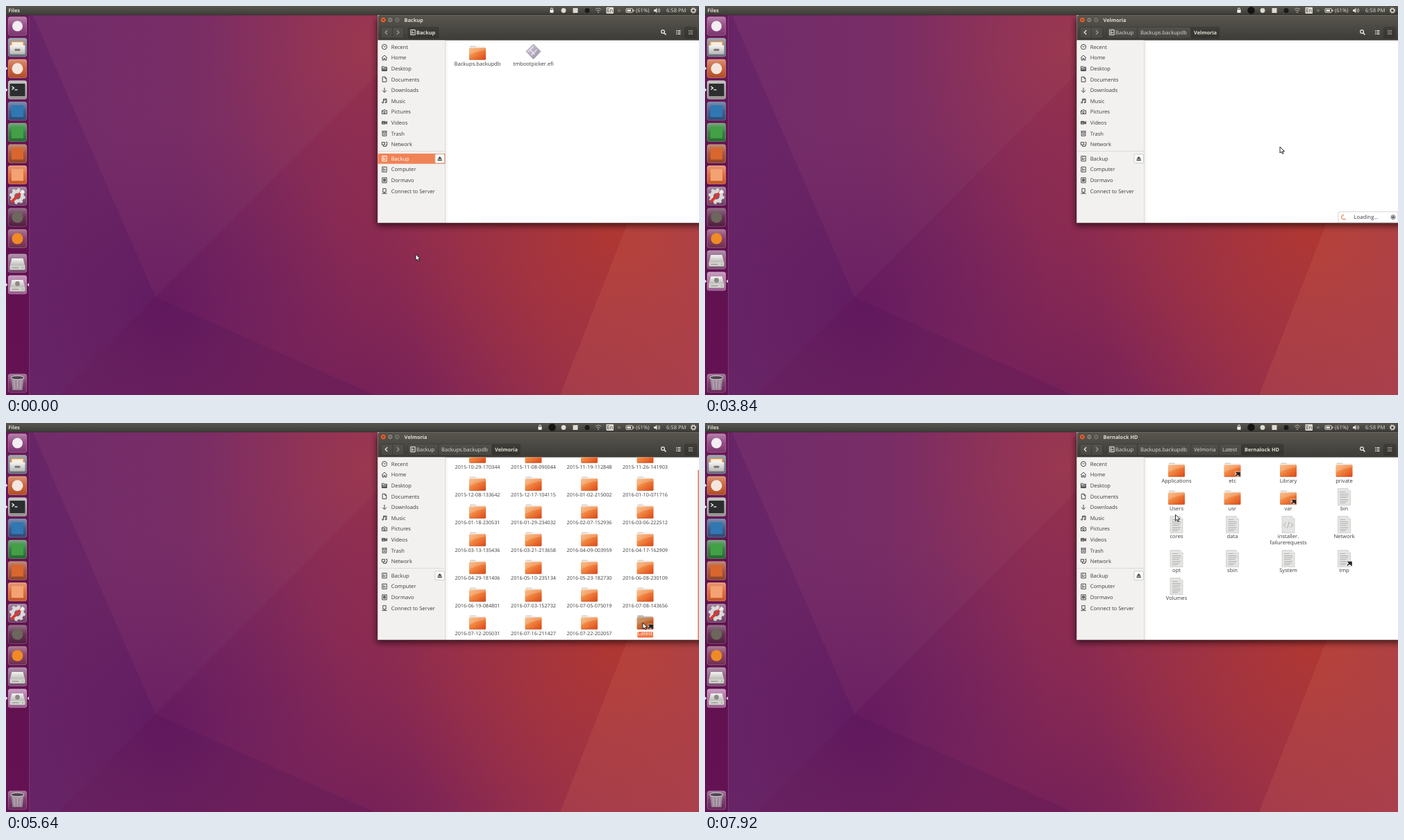
An HTML page that plays this animation: 998 px wide and 561 px high, repeating every 8 s.

```html
<!DOCTYPE html>
<html lang="en">
<head>
<meta charset="utf-8">
<title>File browser</title>
<style>
  html, body { margin: 0; width: 100%; height: 100%; overflow: hidden; background: #6c2566; }
  svg { display: block; width: 100%; height: 100%; }
  text { font: 7.6px "Open Sans", "Noto Sans", sans-serif; fill: #3c3c3c; text-rendering: geometricPrecision; }
  .bold { font-weight: 700; font-size: 7.35px; }
  .light { fill: #dfdbd2; }
  .label { text-anchor: middle; }
  .date { font-size: 7.25px; }
  .line { fill: none; stroke: #4a4a4a; stroke-width: 1; }
  .picked text, .picked .line { fill: #fff; }
  .picked .line { fill: none; stroke: #fff; }
  .hover { filter: brightness(1.08); }
  .chosen { filter: brightness(.82); }
  .chip { fill: #f07746; }
</style>
</head>
<body>
<svg viewBox="0 0 998 561">
  <defs>
    <linearGradient id="wall">
      <stop offset="0" stop-color="#6d2768"/><stop offset=".25" stop-color="#752862"/>
      <stop offset=".5" stop-color="#8b2b52"/><stop offset=".8" stop-color="#98304a"/>
      <stop offset="1" stop-color="#9e354a"/>
    </linearGradient>
    <radialGradient id="red" gradientUnits="userSpaceOnUse" cx="870" cy="325" r="330">
      <stop offset="0" stop-color="#b23830" stop-opacity=".9"/><stop offset="1" stop-color="#a23440" stop-opacity="0"/>
    </radialGradient>
    <radialGradient id="rose" gradientUnits="userSpaceOnUse" cx="520" cy="60" r="230">
      <stop offset="0" stop-color="#9c354a" stop-opacity=".8"/><stop offset="1" stop-color="#8c2f55" stop-opacity="0"/>
    </radialGradient>
    <radialGradient id="plum" gradientUnits="userSpaceOnUse" cx="230" cy="430" r="270">
      <stop offset="0" stop-color="#65195f" stop-opacity=".9"/><stop offset="1" stop-color="#6b1f5e" stop-opacity="0"/>
    </radialGradient>
    <radialGradient id="dusk" gradientUnits="userSpaceOnUse" cx="500" cy="610" r="330">
      <stop offset="0" stop-color="#6a1c5c" stop-opacity=".85"/><stop offset="1" stop-color="#7a2158" stop-opacity="0"/>
    </radialGradient>
    <linearGradient id="bar" x2="0" y2="1">
      <stop offset="0" stop-color="#58564e"/><stop offset="1" stop-color="#3d3c38"/>
    </linearGradient>
    <linearGradient id="dock" x2="0" y2="1">
      <stop offset="0" stop-color="#691a58"/><stop offset=".5" stop-color="#60104f"/><stop offset="1" stop-color="#641253"/>
    </linearGradient>
    <linearGradient id="gloss" x2="0" y2="1">
      <stop offset="0" stop-color="#fff" stop-opacity=".35"/><stop offset=".5" stop-color="#fff" stop-opacity=".08"/>
      <stop offset="1" stop-color="#000" stop-opacity=".12"/>
    </linearGradient>
    <linearGradient id="metal" x2="0" y2="1">
      <stop offset="0" stop-color="#f4f4f2"/><stop offset="1" stop-color="#b9b7b4"/>
    </linearGradient>
    <linearGradient id="orange" x2="1" y2="1">
      <stop offset="0" stop-color="#f7b06f"/><stop offset=".45" stop-color="#f0843f"/><stop offset="1" stop-color="#dc4616"/>
    </linearGradient>
    <linearGradient id="violet" x2="1" y2="1">
      <stop offset="0" stop-color="#d8d2e0"/><stop offset="1" stop-color="#9488a4"/>
    </linearGradient>
    <radialGradient id="glow" cx=".35" cy="1" r=".75" fy="1">
      <stop offset="0" stop-color="#f4f4f4" stop-opacity=".8"/><stop offset=".6" stop-color="#fafafa" stop-opacity=".6"/>
      <stop offset="1" stop-color="#fff" stop-opacity="0"/>
    </radialGradient>
    <linearGradient id="fade" x2="0" y2="1">
      <stop offset="0" stop-opacity="0"/><stop offset="1" stop-opacity=".07"/>
    </linearGradient>
    <filter id="shadow" x="-10%" y="-10%" width="120%" height="120%"><feGaussianBlur stdDeviation="5"/></filter>
    <clipPath id="pane"><path d="M633 49.5H998V312.5H633Z"/></clipPath>

    <g id="folder">
      <path d="M-11-9.5H-3L-2-8.3H11V-3H-11Z" fill="#d9cfc6"/>
      <path d="M-10.5-8H10.5V0H-10.5Z" fill="#f4f0ec"/>
      <rect x="-12" y="-6.5" width="24" height="17" rx="1" fill="url(#orange)"/>
      <path d="M-11.5-6H11.5V-3Q-1-2-11.5 4Z" fill="#fff" opacity=".2"/>
      <path d="M-11.5 10.2H11.5" stroke="#b8451c" stroke-width=".6"/>
    </g>
    <g id="file">
      <path d="M-9-12.5H5L9-8.5V11.5H-9Z" fill="#e4e4e2" stroke="#c2c2c0" stroke-width=".6"/>
      <path d="M5-12.5V-8.5H9Z" fill="#fafafa" stroke="#c2c2c0" stroke-width=".5"/>
    </g>
    <g id="doc"><use href="#file"/><path d="M-6-7.5H2M-6-4.5H6M-6-2H6M-6 .5H4M-6 3.5H6M-6 6H5M-6 8.3H2" stroke="#b2b2b0" stroke-width="1"/></g>
    <g id="code"><use href="#file"/><path d="M-3.5-3.5L-6.5 0L-3.5 3.5M3.5-3.5L6.5 0L3.5 3.5M1.2-4.5L-1.2 4.5" fill="none" stroke="#aaa"/></g>
    <g id="efi">
      <path d="M0-12L10.5-1.5L0 9.5L-10.5-1.5Z" fill="url(#violet)" stroke="#8d839b" stroke-width=".6"/>
      <path d="M-7-1.5L0-8.5M-3 4L5-4M-4-3L2 3" stroke="#eee9f3" stroke-width="1.3"/>
    </g>
    <g id="link"><rect x="3.5" y="2.5" width="8" height="8" fill="#eee" opacity=".55"/><path d="M4.5 9.5L8.5 5.5M6 4.5H10.5V9Z" fill="#222" stroke="#222" stroke-width="1.5"/></g>
    <g id="drive">
      <path d="M-8-7H8L11 4H-11Z" fill="url(#metal)"/><rect x="-11" y="3.5" width="22" height="6" rx="1" fill="#d4d2cf"/>
      <path d="M-8 6.5H2" stroke="#8c8a88"/><circle cx="7.5" cy="6.5" r="1" fill="#6c6"/>
    </g>
  </defs>

  <rect width="998" height="561" fill="url(#wall)"/>
  <rect width="998" height="561" fill="url(#rose)"/>
  <rect width="998" height="561" fill="url(#dusk)"/>
  <rect width="998" height="561" fill="url(#plum)"/>
  <rect width="998" height="561" fill="url(#red)"/>
  <path d="M33 0L215 420L75 561H33Z" fill="#4d2068" opacity=".2"/>
  <path d="M33 0H632L215 420Z" fill="#fff" opacity=".025"/>
  <path d="M215 420L530 561H75Z" fill="#3c0c4c" opacity=".13"/>
  <path d="M895 313L798 561H998V313Z" fill="#ff9a70" opacity=".1"/>

  <rect y="13" width="33" height="548" fill="url(#dock)"/>
  <path d="M33.5 13V561" stroke="#8d4878" stroke-width=".7" opacity=".7"/>
  <g id="launcher"></g>
  <g id="drives"></g>

  <rect width="998" height="13" fill="url(#bar)"/>
  <path d="M0 13H998" stroke="#2c2a28" stroke-width=".6"/>
  <text class="bold light" x="3.5" y="8.8">Files</text>
  <g id="tray">
    <g id="lock"><rect x="-2.5" y="-.8" width="5" height="4" fill="#fff"/><path d="M-1.5-.5V-2A1.5 1.5 0 0 1 1.5-2V-.5" fill="none" stroke="#fff"/></g>
    <circle id="badge" cx="786.5" cy="6.3" r="5.2" fill="#161412"/>
    <circle cx="803" cy="6.5" r="3.4" fill="#dfdbd2"/>
    <rect x="816.5" y="3" width="7" height="7" fill="#dfdbd2"/>
    <circle cx="837" cy="6.5" r="3.5" fill="#1c1b19"/>
    <g fill="none" stroke="#aaa69d"><path d="M848.8 5Q853 1.3 857.2 5M850.3 7Q853 4.6 855.7 7"/><circle cx="853" cy="9" r=".7"/></g>
    <rect x="864.5" y="1.7" width="10.5" height="9.3" rx="1" fill="#dfdbd2"/>
    <text x="869.8" y="9" class="label">En</text>
    <circle cx="883" cy="6.5" r="2.3" fill="#6b6860"/>
    <rect x="893" y="3.7" width="9.6" height="5.6" rx="1" fill="none" stroke="#dfdbd2"/>
    <path d="M894.5 5H900V8H894.5ZM903.3 5.3H904.5V7.7H903.3Z" fill="#dfdbd2"/>
    <text class="light" x="907" y="9">(61%)</text>
    <path d="M933 5H935L937.5 2.7V10.3L935 8H933Z" fill="#dfdbd2"/>
    <path d="M939 4.5Q940.5 6.5 939 8.5M940.5 3.3Q943 6.5 940.5 9.7" fill="none" stroke="#dfdbd2" stroke-width=".9"/>
    <text class="light" x="951" y="9">6:58 PM</text>
    <circle cx="990" cy="6.5" r="2.5" fill="none" stroke="#dfdbd2" stroke-width="1.3"/>
    <circle cx="990" cy="6.5" r="3.7" fill="none" stroke="#dfdbd2" stroke-width="1.2" stroke-dasharray="1.45"/>
  </g>

  <rect x="534" y="18" width="480" height="299" opacity=".6" filter="url(#shadow)"/>
  <rect x="535.5" y="13" width="470" height="300" fill="#fff"/>
  <path d="M535.5 49.5V16Q535.5 13 538.5 13H998V49.5Z" fill="url(#bar)"/>
  <path d="M538 13.5H998" stroke="#77756c" stroke-width=".6"/>
  <circle cx="543.4" cy="20" r="4" fill="#e9633a" stroke="#312f2b" stroke-width=".6"/>
  <path d="M541.9 18.5L544.9 21.5M544.9 18.5L541.9 21.5" stroke="#5c2412" stroke-width=".9"/>
  <g fill="#817f76" stroke="#312f2b" stroke-width=".6"><circle cx="553.3" cy="20" r="3.9"/><circle cx="563.3" cy="20" r="3.9"/></g>
  <path d="M551.5 20H555.1M561.8 18.6H564.8V21.4H561.8Z" fill="none" stroke="#3c3b37" stroke-width=".8"/>
  <g fill="#fff" fill-opacity=".05" stroke="#33322e" stroke-width=".6">
    <rect x="540" y="30.5" width="33" height="16" rx="2"/>
    <path d="M556.5 30.5V46.5"/>
    <rect x="977.5" y="30.5" width="17" height="16" rx="2" fill="#000" fill-opacity=".15"/>
  </g>
  <g fill="none" stroke="#f0ede6" stroke-width="1.2">
    <path id="back" d="M549.2 35L546.2 38L549.2 41"/>
    <path d="M563 35L566 38L563 41" stroke="#a09d94"/>
    <circle cx="946" cy="37" r="2.4"/><path d="M947.8 38.8L950.5 41.5" stroke-width="1.6"/>
    <path d="M965 35.7H966.4M965 38H966.4M965 40.3H966.4M967.4 35.7H971.5M967.4 38H971.5M967.4 40.3H971.5"/>
    <path d="M983 35.7H989M983 38H989M983 40.3H989" stroke="#b5b2a9" stroke-dasharray="1.5 .75"/>
  </g>
  <text id="title" class="bold light" x="573.5" y="22.8"></text>
  <g id="crumbs"></g>

  <path d="M535.5 49.5H632.5V313H535.5Z" fill="#f2f1f0"/>
  <path d="M632.7 49.5V313" stroke="#cfcac5" stroke-width=".8"/>
  <path d="M633.3 49.5H636V313H633.3Z" opacity=".03"/>
  <path d="M535.5 209.5H632.5" stroke="#d6d2ce" stroke-width=".7"/>
  <rect id="mark" x="535.5" y="212.8" width="97" height="14.8" fill="#f08355"/>
  <g id="places"></g>
  <rect x="618" y="213.6" width="13.4" height="13" rx="1.5" fill="#fbfbfa" stroke="#c3beb9" stroke-width=".7"/>
  <path d="M621.5 220.5L624.7 217L627.9 220.5ZM621.5 221.5H627.9V222.9H621.5Z" fill="#3c3c3c"/>

  <g clip-path="url(#pane)">
    <g id="items"></g>
    <rect id="overshoot" x="633" y="262" width="365" height="51" fill="url(#glow)"/>
    <rect id="shade" x="633" y="300" width="365" height="13" fill="url(#fade)"/>
    <rect id="thumb" x="996.3" width="2" height="245" fill="#ee8158"/>
  </g>
  <g id="loading">
    <path d="M998 296.8H914Q912 296.8 912 298.8V312.7H998Z" fill="#fff" stroke="#c9c5c1" stroke-width=".7"/>
    <path id="spinner" d="M2.6 2.1A3.3 3.3 0 1 1 0-3.3" fill="none" stroke="#ea7a4c" stroke-width="1.2"/>
    <text x="934.5" y="307.4" style="font-size:7.8px">Loading…</text>
    <circle cx="991" cy="304.5" r="2.9" fill="none" stroke="#3c3c3c" stroke-width=".9"/><circle cx="991" cy="304.5" r="1.5" fill="#3c3c3c"/>
  </g>
  <path d="M535.5 312.8H998" stroke="#3a2622" stroke-width=".6" opacity=".6"/>
  <path id="cursor" d="M0 0V9L2-.2L2 7.2L3.4 10.2L5 9.5L3.7 6.6H6.5Z" fill="#fff" stroke="#151515" stroke-width=".9" stroke-linejoin="round"/>
</svg>
<script>
const LOOP = 8000, STEP = 120;
const $ = id => document.getElementById(id);
const show = (id, on) => $(id).style.display = on ? '' : 'none';
const at = (x, y, body) => `<g transform="translate(${x} ${y})">${body}</g>`;

$('cursor').setAttribute('d', 'M0 0V9L2.1 7.1L3.4 10.2L5 9.5L3.7 6.6H6.5Z');

// Launcher
const tile = (y, color, art) => at(16.5, y,
  `<rect x="-13.5" y="-13.5" width="27" height="27" rx="3" fill="${color}"/>
   <rect x="-13.2" y="-13.2" width="26.4" height="26.4" rx="3" fill="url(#gloss)" stroke="#fff" stroke-opacity=".3" stroke-width=".7"/>${art}`);
const disc = (color, r = 8) => `<circle r="${r}" fill="${color}"/>`;
const block = (color, s = 17) => `<rect x="${-s / 2}" y="${-s / 2}" width="${s}" height="${s}" fill="${color}"/>`;
const arrow = y => `<path d="M0 ${y - 2.5}L2.5 ${y}L0 ${y + 2.5}Z" fill="#e9e3e8"/>`;
const cabinet = `<path d="M-9-9H9L11-2H-11Z" fill="#e8964e"/><path d="M-8-7.5H8V-2H-8Z" fill="#f5efe4"/>
  <rect x="-11" y="-3" width="22" height="13" rx="1" fill="url(#metal)"/><rect x="-4" y="2" width="8" height="3" rx="1" fill="#777"/>`;
const terminal = `<rect x="-11" y="-9" width="22" height="18" rx="1" fill="#2b2d2e"/>
  <path d="M-8-5L-5-2.7L-8-.4M-4 0H0" fill="none" stroke="#fff" stroke-width="1.3"/>`;
const gear = `<circle r="7" fill="none" stroke="#dcdad8" stroke-width="5"/>
  <circle r="10" fill="none" stroke="#dcdad8" stroke-width="3" stroke-dasharray="3.9"/>
  <path d="M-8 8L5-5" stroke="#d63a32" stroke-width="4" stroke-linecap="round"/><path d="M4-4L8-9M5-4L10-7" stroke="#f2f2f0" stroke-width="2.4"/>`;
const bin = `<path d="M-9-8H9L7 10H-7Z" fill="#a9a3aa" opacity=".75"/><ellipse cy="-8" rx="9.5" ry="2.8" fill="#4f454f" stroke="#dedade"/>
  <path d="M-5-4L-4 8M0-4V8M5-4L4 8" stroke="#e8e4e8" stroke-width=".8" opacity=".6"/>`;
const tiles = [
  ['#8a3c7b', disc('#f3eef2', 7.5)], ['#6c7886', cabinet], ['#c3562a', disc('#f4e6df')], ['#a5a3a1', terminal],
  ['#36507f', block('#2f78b3')], ['#2a7336', block('#43a047')], ['#9c4a2c', block('#d9662f')], ['#d8602c', block('#f3a273')],
  ['#77496f', gear], ['#572045', disc('#6d665c')], ['#7c3358', disc('#f08a24')]];
$('launcher').innerHTML = tiles.map(([color, art], i) => tile(29 + i * 30.65, color, art)).join('')
  + tile(544, '#6f2d62', bin) + arrow(90) + arrow(121);
$('drives').innerHTML = tile(366, '#84537a', '<use href="#drive"/>')
  + tile(397, '#a8689c', '<use href="#drive"/><circle cy="-1.5" r="3.4" fill="#8b8987"/>')
  + arrow(397) + '<path d="M33 394.5L30.5 397L33 399.5Z" fill="#e9e3e8"/>';

// Sidebar
const disk = 'M-3.2-3.6H3.2V3.6H-3.2ZM1.5-.4A1.5 1.5 0 1 1 0-1.9M-1.8 2L0 0';
const places = [
  ['Recent', 'M3.6 0A3.6 3.6 0 1 1-3.6 0A3.6 3.6 0 1 1 3.6 0ZM-1.5-1.2L0 .3L1.7-.9'],
  ['Home', 'M-4 .3L0-3.5L4 .3M-2.8 0V3.5H-.8V1H.8V3.5H2.8V0'],
  ['Desktop', 'M-3.6 3.3V-3H-.8L0-2H3.4V3.3ZM-3.5-.4H3.4M-3.5 1H3.4M-3.5 2.2H3.4'],
  ['Documents', 'M-2.8-3.6H1L2.8-1.6V3.6H-2.8ZM.8-3.5V-1.4H2.8'],
  ['Downloads', 'M0-3.6V3M-3 .3L0 3.3L3 .3'],
  ['Music', 'M-1.4 2.2V-3H3V1.8M-1.4-1.5H3M-1.4 2.2A1 1 0 1 1-3.4 2.2A1 1 0 1 1-1.4 2.2M3 1.8A1 1 0 1 1 1 1.8A1 1 0 1 1 3 1.8'],
  ['Pictures', 'M-3.5-1.8H-1.5L-.8-3H.8L1.5-1.8H3.5V3H-3.5ZM1.3 .6A1.3 1.3 0 1 1-1.3 .6A1.3 1.3 0 1 1 1.3 .6M-3-.9H-2'],
  ['Videos', 'M-3.5-1.8H1V2H-3.5ZM1 0L3.5-1.8V2ZM-3.5-.5H1M-3.5 .7H3'],
  ['Trash', 'M-3.5-3.3H3.5M-2.8-3V3.5H2.8V-3M-2.8-1.3H2.8M-.8 0V2.2M.9 0V2.2'],
  ['Network', 'M-3.7-2.8H.5V.8H-3.7ZM2-3H3.8V1H2M-1.6 .8V3H2.6V1'],
  ['Backup', disk], ['Computer', disk],
  ['Dormavo', 'M-3.2-3.6H3.2V3.6H-3.2ZM-1.3-1.8H1.3V1.6H-1.3ZM0-1.8V1.6M-1.3 0H1.3'],
  ['Connect to Server', 'M-2.2-3.6H2.2V1.6H-2.2ZM0 1.6V3.5M-3.6 3.5H3.6']];
$('places').innerHTML = places.map(([name, icon], i) =>
  `<g id="place${i}">${at(545, 59 + i * 15.6 + (i > 9 ? 5.1 : 0), `<path class="line" d="${icon}"/><text x="9.7" y="2.7">${name}</text>`)}</g>`).join('');

// Folder contents; suffixes: * document, # code, ~ firmware image, > link
const dates = `2015-10-29-170344 2015-11-08-090044 2015-11-19-112848 2015-11-26-141903
  2015-12-08-133642 2015-12-17-104115 2016-01-02-215002 2016-01-10-071716
  2016-01-18-230531 2016-01-29-234032 2016-02-07-152936 2016-03-06-222512
  2016-03-13-135436 2016-03-21-213658 2016-04-09-003959 2016-04-17-162909
  2016-04-29-181406 2016-05-10-235134 2016-05-23-182730 2016-06-08-230109
  2016-06-19-084801 2016-07-03-152732 2016-07-05-075019 2016-07-08-143656
  2016-07-12-205031 2016-07-16-211427 2016-07-22-202057 Latest>`.split(/\s+/);
const system = `Applications etc> Library private Users usr var> bin* cores* data*
  installer.|failurerequests# Network* opt* sbin* System* tmp*> Volumes*`.split(/\s+/);
const crumbs = [['Backup', 591, 579, 623], ['Backups.backupdb', 627, 622.5, 701], ['Velmoria', 704, 699.5, 740.5],
  ['Latest', 745, 740, 773], ['Bernalock HD', 777, 772.5, 833]];

// Each view: start, depth, items, extras
const views = [
  [0, 1, ['Backups.backupdb', 'tmbootpicker.efi~']],
  [1680, 1, ['Backups.backupdb', 'tmbootpicker.efi~'], { chosen: 0 }],
  [1800, 2, ['Velmoria']],
  [3000, 2, ['Velmoria'], { chosen: 0 }],
  [3240, 3, []],
  [3720, 3, [], { loading: true }],
  [4080, 3, dates],
  [4920, 3, dates, { scroll: 20 }],
  [5640, 3, dates, { scroll: 20, chosen: 27 }],
  [5760, 4, []],
  [6000, 4, ['Bernalock HD'], { shade: true }],
  [6840, 4, ['Bernalock HD'], { shade: true, chosen: 0 }],
  [6960, 5, [], { shade: true }],
  [7440, 5, system]];

// Pointer tip: time, x, y
const path = [[0, 590, 358], [360, 590, 358], [960, 692, 31], [1200, 684, 67], [2160, 684, 67], [2280, 678.5, 93.5],
  [2520, 682, 114], [2880, 680, 70], [3000, 680, 68], [3600, 680, 68], [3840, 828, 203], [4440, 851, 209],
  [4920, 851, 209], [5520, 917, 288], [6120, 917, 288], [6600, 673, 67.5], [7440, 673, 67.5], [7920, 677.5, 132]];

function pointer(t) {
  const i = path.findIndex(p => p[0] > t);
  if (i < 0) return path[path.length - 1].slice(1);
  const [a, b] = [path[i - 1], path[i]], k = (t - a[0]) / (b[0] - a[0]);
  return [a[1] + (b[1] - a[1]) * k, a[2] + (b[2] - a[2]) * k];
}

function itemMarkup(entry, i, items, scroll) {
  const lines = entry.replace(/[*#~>]/g, '').split('|');
  const kind = /\*/.test(entry) ? 'doc' : /#/.test(entry) ? 'code' : /~/.test(entry) ? 'efi' : 'folder';
  const row = Math.floor(i / 4);
  const wrapped = items.slice(0, row * 4).some(name => name.includes('|')) ? 9 : 0;
  const link = entry.includes('>') ? '<use href="#link"/>' : '';
  const size = /^\d/.test(entry) ? 'label date' : 'label';
  return at(679 + (i % 4) * 80.5, 67 + row * 40 + wrapped - scroll,
    `<g class="icon"><use href="#${kind}"/>${link}</g>` +
    lines.map((line, n) => `<text class="${size}" y="${19 + n * 9}">${line}</text>`).join(''));
}

function drawView([, depth, items, { chosen = -1, scroll = 0, loading, shade } = {}]) {
  $('title').textContent = crumbs[depth - 1][0];
  $('back').setAttribute('stroke', depth > 1 ? '#f0ede6' : '#a09d94');
  const shown = crumbs.slice(0, depth);
  $('crumbs').innerHTML = shown.map(([name, x, left, right], i) => {
    const active = i === depth - 1;
    return `<rect x="${left}" y="30.5" width="${right - left}" height="16" rx="2" fill="${active ? '#000' : '#fff'}"
      fill-opacity="${active ? .17 : .04}" stroke="#33322e" stroke-width=".5"/>
      <text class="light ${active ? 'bold' : ''}" x="${x}" y="40.8">${name}</text>`;
  }).join('') + at(586, 38, `<path class="line" style="stroke:#f0ede6" d="${disk}"/>`);
  show('mark', depth === 1);
  $('place10').setAttribute('class', depth === 1 ? 'picked' : '');
  show('loading', loading);
  show('shade', shade);
  show('thumb', items === dates);
  $('thumb').setAttribute('y', 49 + scroll * .94);
  $('items').innerHTML = items.map((name, i) => itemMarkup(name, i, items, scroll)).join('');
  const picked = $('items').children[chosen];
  if (picked) {
    const label = picked.querySelector('text'), box = label.getBBox();
    label.style.fill = '#fff';
    label.insertAdjacentHTML('beforebegin',
      `<rect class="chip" x="${box.x - .5}" y="14" width="${box.width + 1}" height="8.5" rx="1.5"/>`);
  }
}

let current;
function frame(now) {
  const t = Math.floor(now % LOOP / STEP) * STEP;
  const view = views.filter(v => v[0] <= t).pop();
  if (view !== current) drawView(current = view);

  const started = t >= 120;
  $('drives').setAttribute('transform', `translate(0 ${started ? 0 : 5})`);
  $('lock').setAttribute('transform', `translate(${started ? 769 : 786} 6.5)`);
  show('badge', started);

  const [x, y] = pointer(t);
  $('cursor').setAttribute('transform', `translate(${x} ${y})`);
  const { chosen = -1, scroll = 0 } = view[3] || {};
  [...$('items').children].forEach((item, i) => {
    const { e, f } = item.transform.baseVal[0].matrix;
    const over = Math.abs(x - e) < 12 && Math.abs(y - f) < 11;
    item.firstChild.setAttribute('class', 'icon' + (i === chosen ? ' chosen' : over ? ' hover' : ''));
  });
  $('overshoot').style.opacity = scroll ? Math.max(0, 1 - (t - 4920) / 480) : 0;
  $('spinner').setAttribute('transform', `translate(920 304.5) rotate(${(t - 3840) * .75})`);
  requestAnimationFrame(frame);
}
requestAnimationFrame(frame);
</script>
</body>
</html>
```
